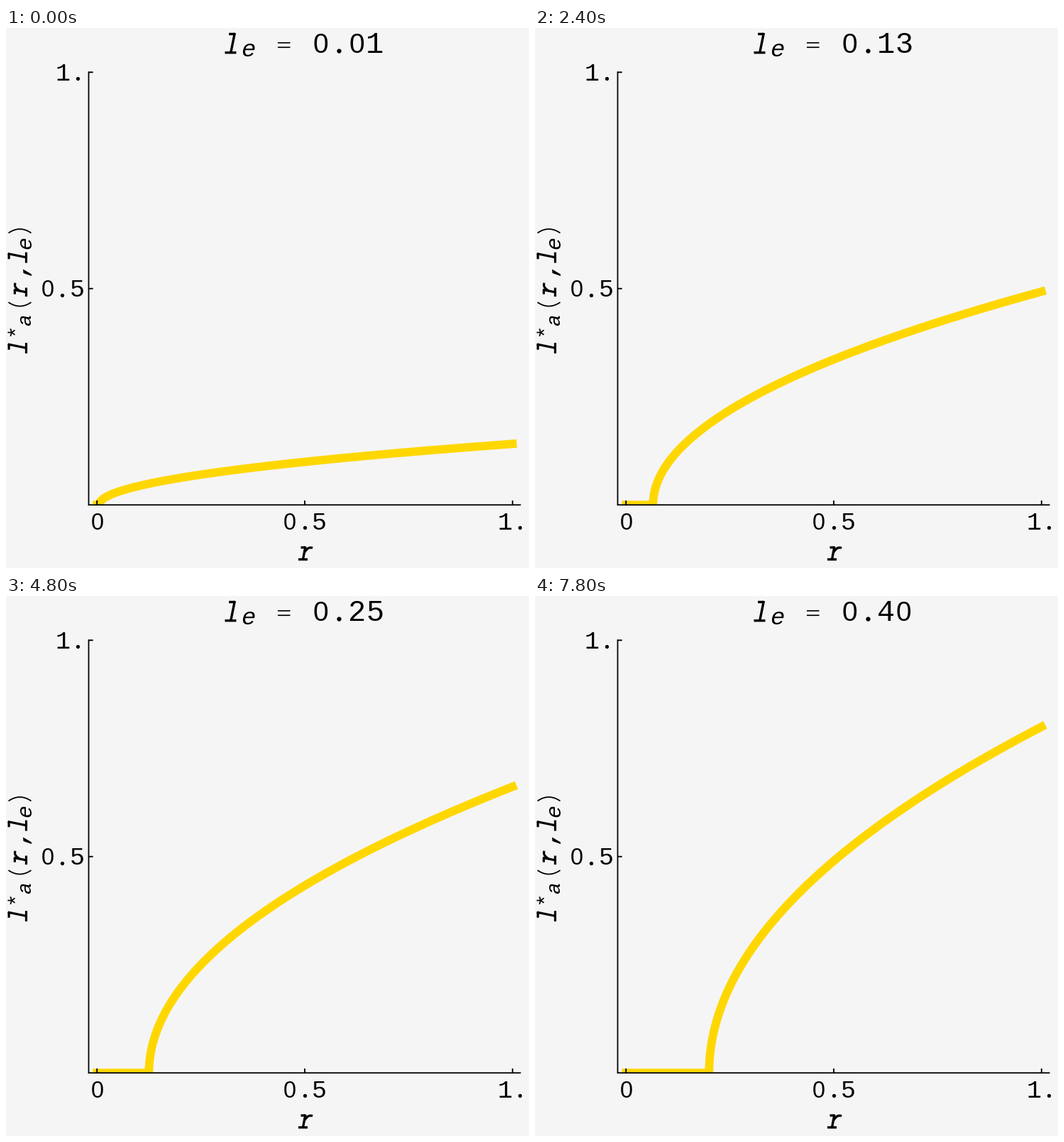
Write a matplotlib script that moves like this. It is 737x760 px and loops after 8000 ms.

```python
import numpy as np
import matplotlib.pyplot as plt
from matplotlib.animation import FuncAnimation
from matplotlib.patches import Polygon, Rectangle

W, H, DPI = 737, 760, 64
PT = 72 / DPI  # points per pixel
LEFT, TOP, BOTTOM, SIDE = 116.5, 62.3, 671.2, 609
UNIT = SIDE / 1.04
X0 = LEFT + 0.02 * UNIT
FRAMES = 40

fig = plt.figure(figsize=(W / DPI, H / DPI), dpi=DPI, facecolor="#f5f5f5")
ax = fig.add_axes([0, 0, 1, 1])
ax.set_xlim(0, W)
ax.set_ylim(H, 0)
ax.axis("off")


def px(r):
    return X0 + UNIT * r


def py(v):
    return BOTTOM - (BOTTOM - TOP) * v


def stroke(points, width, cap="butt"):
    x, y = np.transpose(points)
    ax.plot(x, y, color="black", lw=width * PT, solid_capstyle=cap,
            solid_joinstyle="miter", snap=False, zorder=3)


def set_digit(text, char, size):
    # the monospaced zero carries a dot, so a plain one is used
    plain = char == "0"
    text.set_text(char)
    text.set_fontfamily("Liberation Sans" if plain else "Liberation Mono")
    text.set_fontsize(size * PT * (0.93 if plain else 1))


def number(string, x, base, size):
    """Write a number at fixed pitch; x is the centre of its first cell."""
    cells = []
    for i, char in enumerate(string):
        cx = x + 0.602 * size * i
        if char == ".":
            d = 0.15 * size
            ax.plot([cx], [base - d / 2], "o", color="black",
                    ms=d * PT, mew=0, zorder=3)
            cells.append(None)
        else:
            text = ax.text(cx, base, "", ha="center", va="baseline", zorder=3)
            set_digit(text, char, size)
            cells.append(text)
    return cells


def italic(char, x, base, size, angle=0):
    ax.text(x, base, char, family="Liberation Mono", style="italic",
            fontsize=size * PT, ha="center", va="baseline",
            rotation=angle, rotation_mode="anchor", zorder=3)


def bezier(a, b, c):
    t = np.linspace(0, 1, 20)[:, None]
    return (1 - t) ** 2 * np.array(a) + 2 * t * (1 - t) * np.array(b) + t ** 2 * np.array(c)


# slab-serif letters as strokes, measured from the left end of the baseline
LETTERS = {
    "l": [[(0.5, 1.6), (16, 1.6)], [(8.5, 1.6), (14, 28.5)], [(6, 27), (14, 27)]],
    "r": [[(0.5, 1.6), (13.5, 1.6)], [(7, 1.6), (10.5, 19.8)], [(4, 18.4), (10.5, 18.4)],
          bezier((8.8, 11), (14.5, 20.5), (20.5, 17.5))],
}


def letter(char, x, y, scale=1.0, upright=True):
    for part in LETTERS[char]:
        u, v = scale * np.transpose(part)
        pts = (x + u, y - v) if upright else (x - v, y - u)
        stroke(np.transpose(pts), 3.3 * scale)


# frame and ticks
stroke([(LEFT, TOP - 1), (LEFT, BOTTOM), (LEFT + SIDE, BOTTOM)], 1.8)
for v in (0.5, 1):
    stroke([(LEFT, py(v)), (LEFT + 6.2, py(v))], 1.9)
for r in (0, 0.5, 1):
    stroke([(px(r), BOTTOM), (px(r), BOTTOM - 6.2)], 1.9)

number("1.", 80, 73.7, 35)
number("0.5", 58.3, 378.3, 35)
number("0", 128.3, 705.5, 35)
number("0.5", 399.7, 705.5, 35)
number("1.", 703, 705.5, 35)

# horizontal axis label
letter("r", 411.5, 749.5)

# vertical axis label, read upwards
letter("l", 30, 458.5, 0.96, upright=False)
for a in np.pi + np.arange(5) * 2 * np.pi / 5:
    stroke([(8, 428.5), (8 + 5.6 * np.cos(a), 428.5 + 5.6 * np.sin(a))], 1.7)
italic("a", 35.3, 409.3, 28, 90)
stroke(bezier((3.5, 386), (19.5, 397), (35.5, 386)), 1.8)
letter("r", 30, 378.5, 0.96, upright=False)
ax.add_patch(Polygon([(24, 339.5), (24.5, 345), (36, 349), (36, 346.5)],
                     color="black", lw=0, zorder=3))
letter("l", 30, 331, 0.96, upright=False)
italic("e", 35.3, 302.3, 30, 90)
stroke(bezier((3.5, 288.5), (19.5, 277.5), (35.5, 288.5)), 1.8)

# title
letter("l", 308, 36.3, 1.03)
italic("e", 341.7, 40.5, 34)
for y in (20.8, 27.2):
    stroke([(383, y), (400.5, y)], 1.7)
title = number("0.01", 443.8, 35.3, 42)

curve, = ax.plot([], [], color="#ffd700", lw=11.8 * PT, zorder=2,
                 solid_capstyle="projecting", solid_joinstyle="round")
# the curve is cut off at the horizontal axis
curve.set_clip_path(Rectangle((0, BOTTOM), W, -BOTTOM, transform=ax.transData))


def update(i):
    le = 0.01 * (i + 1)
    # la = sqrt(2 r le - le^2), zero below r = le / 2
    la = np.linspace(0, np.sqrt(2 * le - le ** 2), 200)
    r = (la ** 2 + le ** 2) / (2 * le)
    curve.set_data(px(np.append(0, r)), py(np.append(0, la)))
    for cell, char in zip(title, f"{le:.2f}"):
        if cell is not None:
            set_digit(cell, char, 42)
    return [curve] + [c for c in title if c is not None]


anim = FuncAnimation(fig, update, frames=FRAMES, interval=200, repeat=True,
                     repeat_delay=0, init_func=lambda: update(0))
plt.show()
```
